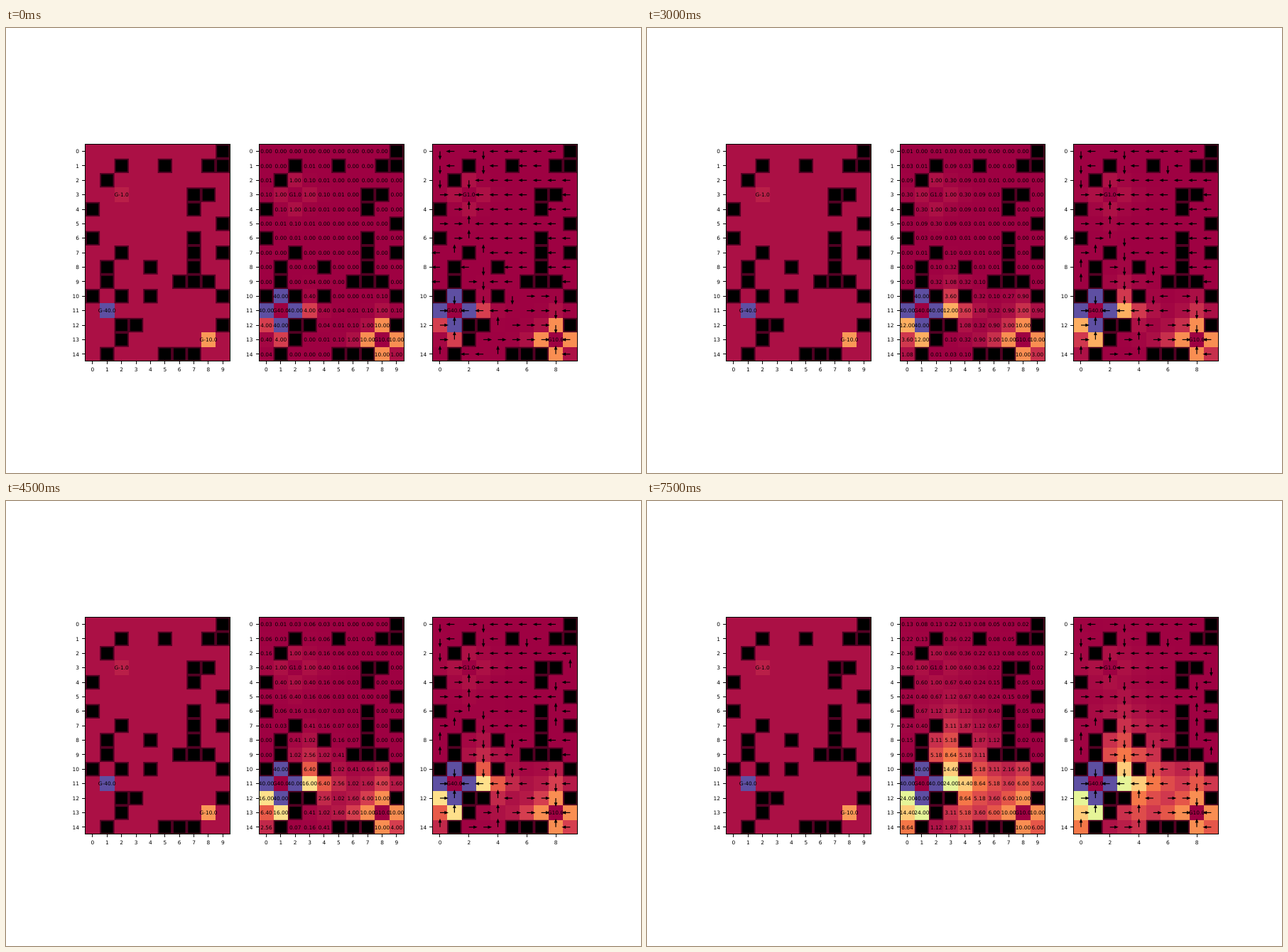
An HTML page with a canvas for the animation above (8000 ms loop, 894 by 626 pixels).

```html
<!DOCTYPE html>
<html lang="en">
<head>
<meta charset="utf-8">
<title>Value iteration</title>
<style>
html, body { margin: 0; width: 100%; height: 100%; overflow: hidden; background: #fff; }
canvas { display: block; }
</style>
</head>
<body>
<canvas id="stage" width="894" height="626"></canvas>
<script>
const ctx = document.getElementById('stage').getContext('2d');

const LOOP = 8000, STEP = 1500;
const ROWS = 15, COLS = 10;
const LEFT = 111.75, TOP = 163.3, CELL = 20.378, PITCH = 244.53;
const WIDTH = CELL * COLS, HEIGHT = CELL * ROWS;
const FONT = 7.45;

// One string of wall columns per row.
const WALLS = ['9', '2589', '1', '78', '07', '9', '07', '279',
  '147', '1678', '0249', '', '239', '2', '1567'];
const GOALS = { '3,2': 1, '11,1': 40, '13,8': 10 };
const MOVES = [[0, -1], [0, 1], [-1, 0], [1, 0]];
const SPECTRAL = ['9e0142', 'd53e4f', 'f46d43', 'fdae61', 'fee08b', 'ffffbf',
  'e6f598', 'abdda4', '66c2a5', '3288bd', '5e4fa2']
  .map(h => [0, 2, 4].map(i => parseInt(h.slice(i, i + 2), 16)));

const isWall = (r, c) => WALLS[r].includes(c);
const goalAt = (r, c) => GOALS[r + ',' + c] || 0;
const isOpen = (r, c) => r >= 0 && r < ROWS && c >= 0 && c < COLS && !isWall(r, c);

function eachCell(fn) {
  for (let r = 0; r < ROWS; r++) for (let c = 0; c < COLS; c++) fn(r, c);
}

function spectral(f) {
  const p = Math.min(Math.max(f, 0), 1) * 10;
  const i = Math.min(Math.floor(p), 9);
  const mix = SPECTRAL[i].map((v, k) => Math.round(v + (SPECTRAL[i + 1][k] - v) * (p - i)));
  return `rgb(${mix})`;
}

// Synchronous sweeps until the largest change drops below 0.01.
function solve(gamma) {
  const blank = () => Array.from({ length: ROWS }, () => Array(COLS).fill(0));
  let values = blank(), policy, delta;
  do {
    const next = blank();
    policy = blank();
    delta = 0;
    eachCell((r, c) => {
      if (isWall(r, c) || goalAt(r, c)) return;
      let best = -1;
      MOVES.forEach(([dr, dc], k) => {
        const inside = isOpen(r + dr, c + dc);
        const nr = inside ? r + dr : r, nc = inside ? c + dc : c;
        const q = goalAt(nr, nc) + gamma * values[nr][nc];
        if (q > best) { best = q; policy[r][c] = k; }
      });
      next[r][c] = best;
      delta = Math.max(delta, Math.abs(best - values[r][c]));
    });
    values = next;
  } while (delta >= 0.01);
  return { values, policy };
}

const solutions = [1, 2, 3, 4, 5, 6].map(n => solve(n / 10));

function label(text, x, y, align = 'center') {
  ctx.fillStyle = '#000';
  ctx.textAlign = align;
  ctx.fillText(text, x, y + FONT * 0.365);
}

function arrow(x, y, [dr, dc]) {
  ctx.save();
  ctx.translate(x, y);
  ctx.rotate(Math.atan2(dr, dc));
  ctx.fillStyle = '#000';
  ctx.fillRect(0, -0.6, 7, 1.2);
  ctx.beginPath();
  ctx.moveTo(12, 0);
  ctx.lineTo(6.3, -2.3);
  ctx.lineTo(6.3, 2.3);
  ctx.fill();
  ctx.restore();
}

function wall(x, y) {
  const core = 16.4;
  ctx.fillStyle = 'rgba(0,0,0,0.5)';
  ctx.fillRect(x - CELL / 2, y - CELL / 2, CELL, CELL);
  ctx.fillStyle = '#000';
  ctx.fillRect(x - core / 2, y - core / 2, core, core);
}

function panel(index, tickStep, shade, mark) {
  const x0 = LEFT + PITCH * index;
  const cx = c => x0 + (c + 0.5) * CELL;
  const cy = r => TOP + (r + 0.5) * CELL;
  const edge = n => Math.round(n);

  eachCell((r, c) => {
    const x = edge(x0 + c * CELL), y = edge(TOP + r * CELL);
    ctx.fillStyle = spectral(shade(r, c));
    ctx.fillRect(x, y, edge(x0 + (c + 1) * CELL) - x, edge(TOP + (r + 1) * CELL) - y);
  });
  eachCell((r, c) => {
    if (isWall(r, c)) wall(cx(c), cy(r));
    else mark(r, c, cx(c), cy(r));
  });

  const x = Math.floor(x0) + 0.5, y = Math.floor(TOP) + 0.5;
  const right = Math.floor(x0 + WIDTH) + 0.5, bottom = Math.floor(TOP + HEIGHT) + 0.5;
  ctx.strokeStyle = '#000';
  ctx.lineWidth = 1;
  ctx.strokeRect(x, y, right - x, bottom - y);
  ctx.beginPath();
  for (let c = 0; c < COLS; c += tickStep) {
    const tx = Math.floor(cx(c)) + 0.5;
    ctx.moveTo(tx, bottom);
    ctx.lineTo(tx, bottom + 4.4);
    label(c, cx(c), bottom + 12);
  }
  for (let r = 0; r < ROWS; r += tickStep) {
    const ty = Math.floor(cy(r)) + 0.5;
    ctx.moveTo(x, ty);
    ctx.lineTo(x - 4.4, ty);
    label(r, x0 - 8.7, cy(r), 'right');
  }
  ctx.stroke();
}

function draw(time) {
  const { values, policy } = solutions[Math.floor((time % LOOP) / STEP)];
  const shade = (r, c) => values[r][c] / 40;
  ctx.fillStyle = '#fff';
  ctx.fillRect(0, 0, 894, 626);
  ctx.font = `${FONT}px "DejaVu Sans", sans-serif`;

  panel(0, 1, (r, c) => ((isWall(r, c) ? -1 : goalAt(r, c)) + 1) / 41, (r, c, x, y) => {
    if (goalAt(r, c)) label('G-' + goalAt(r, c).toFixed(1), x, y);
  });
  panel(1, 1, shade, (r, c, x, y) => {
    const goal = goalAt(r, c);
    label(goal ? 'G' + goal.toFixed(1) : values[r][c].toFixed(2), x, y);
  });
  panel(2, 2, shade, (r, c, x, y) => {
    const goal = goalAt(r, c);
    if (goal) label('G' + goal.toFixed(1), x, y);
    else arrow(x, y, MOVES[policy[r][c]]);
  });
}

const start = performance.now();
function tick() {
  draw(performance.now() - start);
  requestAnimationFrame(tick);
}
tick();
</script>
</body>
</html>
```
